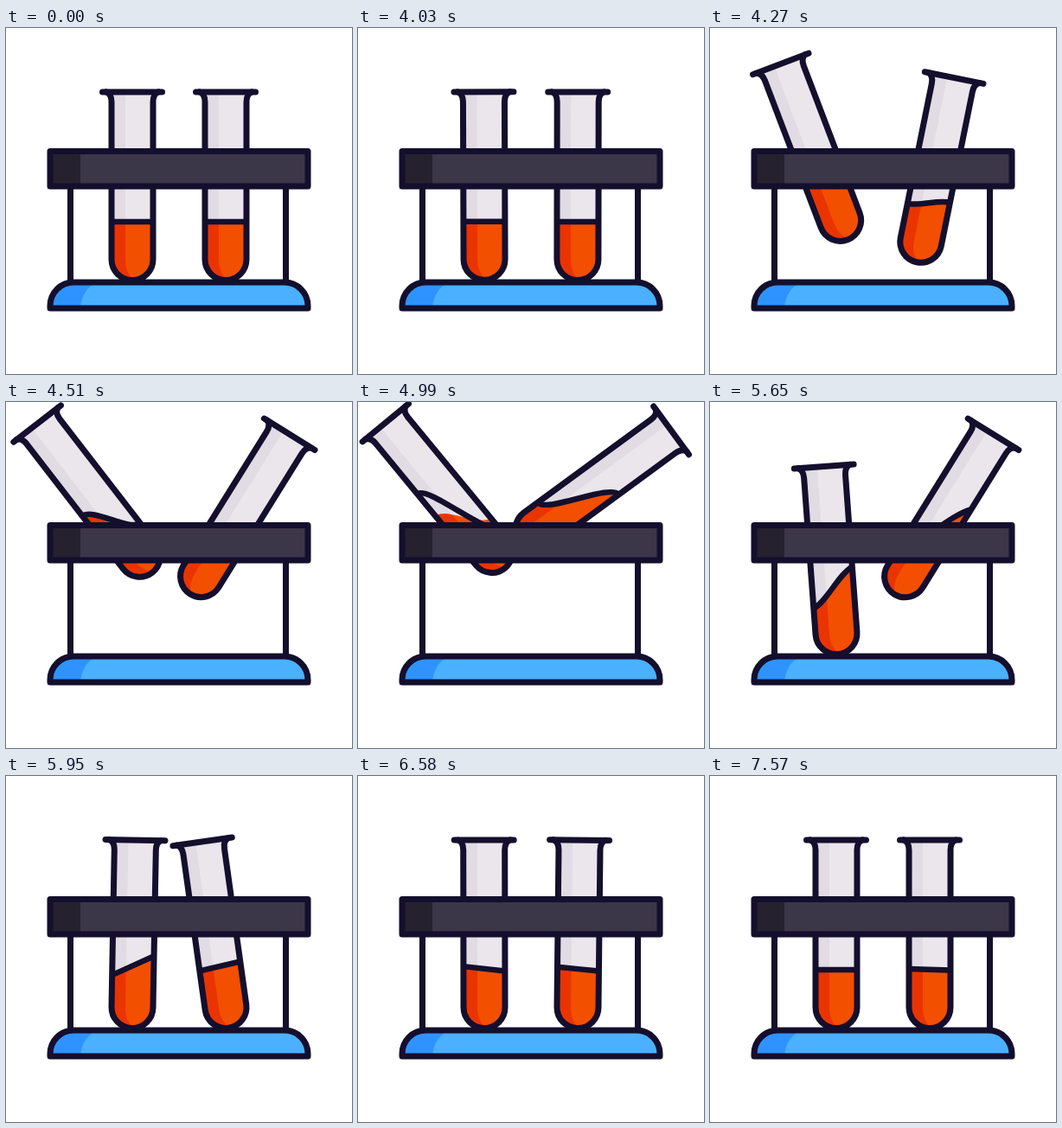
Recreate the animation shown at these times as an HTML page. Size 400 by 400 pixels, loop 7.63 s.

```html
<!DOCTYPE html>
<html lang="en">
<head>
<meta charset="utf-8">
<title>Test tubes</title>
<style>
html, body { margin: 0; width: 100%; height: 100%; overflow: hidden; background: #fff; }
svg { display: block; width: 100vw; height: 100vh; }
.ink { fill: none; stroke: #130f2d; stroke-width: 7; stroke-linecap: round; stroke-linejoin: round; }
.line { stroke-width: 6.5; }
</style>
</head>
<body>
<svg viewBox="0 0 400 400">
  <defs>
    <path id="shape" d="M-30-193.5Q-24-191-24-182V0A24 24 0 0 0 24 0V-182Q24-191 30-193.5"/>
    <path id="side" d="M-24-190H-8V0Q-8 16 2 24H-24Z"/>
    <path id="base" d="M51 324V321A27 27 0 0 1 78 294H322A27 27 0 0 1 349 321V324Z"/>
    <clipPath id="inside"><use href="#shape"/></clipPath>
    <clipPath id="strip"><use href="#side"/></clipPath>
  </defs>

  <path class="ink" d="M74.5 184V294M323.5 184V294"/>
  <g id="tubes"></g>

  <use href="#base" fill="#4ab0ff"/>
  <path fill="#2f93ff" d="M51 324V321A27 27 0 0 1 78 294H106Q88 301 86 324Z"/>
  <use href="#base" class="ink"/>

  <path fill="#3c3649" d="M51 142.5H349V183H51Z"/>
  <path fill="#26212f" d="M51 142.5H86V183H51Z"/>
  <path class="ink" d="M51 142.5H349V183H51Z"/>
</svg>

<script>
const LOOP = 7630, START = 4010, DROP = 530, LEVEL = -43.5;

// dx, dy, angle: full lift; rise, lag: pace of tube and liquid; drop: when it falls back
const tubes = [
  { x: 146, dx: 9, dy: -97, angle: -40.5, rise: 307, drop: 4940, tilt: 48, lag: 609, cap: 21 },
  { x: 254, dx: -50, dy: -126, angle: 56, rise: 546, drop: 5410, tilt: -50, lag: 765, cap: 50 }
];

const clamp = (v, lo, hi) => Math.min(hi, Math.max(lo, v));
const smooth = p => { p = clamp(p, 0, 1); return p * p * (3 - 2 * p); };

// Soft rise towards 1, then an eased drop back to 0
const lift = (t, pace, drop) => t < START ? 0
  : (1 - Math.exp(-(((t - START) / pace) ** 2))) * (1 - smooth((t - drop) / DROP));

// Damped oscillation beginning at u = 0
const ring = (u, decay, period) => u < 0 ? 0
  : Math.exp(-u / decay) * Math.sin(2 * Math.PI * u / period);

function surface(mean, tilt, bend) {
  const pull = tilt * (1 + 2 * bend) / 3;
  return `M-24 ${mean - tilt}C-8 ${mean - pull} 8 ${mean + pull} 24 ${mean + tilt}`;
}

function pose(tube, t) {
  const side = Math.sign(tube.angle), land = tube.drop + DROP;
  const up = lift(t, tube.rise, tube.drop);
  const angle = tube.angle * up - side * 17 * ring(t - land + 140, 240, 460);
  const y = 267.5 + tube.dy * up ** 1.15;
  tube.g.setAttribute('transform', `translate(${tube.x + tube.dx * up} ${y}) rotate(${angle})`);

  const slant = tube.tilt * lift(t, tube.lag, tube.drop + 130);
  const wave = side * 48 * ring(t - land + 10, 400, 1400);
  const tilt = slant + wave, rest = Math.abs(slant) + Math.abs(wave);
  const bend = 1 - clamp((t - 5350) / 600, 0, 1);
  const liquid = surface(LEVEL - 0.42 * Math.min(rest, tube.cap), clamp(tilt, -tube.cap, tube.cap), -0.5 + 1.5 * bend + (1 - bend) * 0.5);
  for (const el of tube.liquid) el.setAttribute('d', liquid + 'V30H-24Z');
  tube.line.setAttribute('d', surface(LEVEL - 0.42 * rest, tilt, bend));
}

for (const tube of tubes) {
  const g = tube.g = document.createElementNS('http://www.w3.org/2000/svg', 'g');
  g.innerHTML = `<g clip-path="url(#inside)">
      <use href="#shape" fill="#ebe5ec"/>
      <use href="#side" fill="#e1dbe3"/>
      <path class="liquid" fill="#f24f00"/>
      <path class="liquid" fill="#ea3400" clip-path="url(#strip)"/>
      <path class="ink line"/>
    </g>
    <use href="#shape" class="ink"/>
    <path class="ink" d="M-34.5-193.5H34.5"/>`;
  tube.liquid = g.querySelectorAll('.liquid');
  tube.line = g.querySelector('.line');
  document.getElementById('tubes').append(g);
}

function draw(now) {
  for (const tube of tubes) pose(tube, now % LOOP);
  requestAnimationFrame(draw);
}
draw(0);
</script>
</body>
</html>
```
